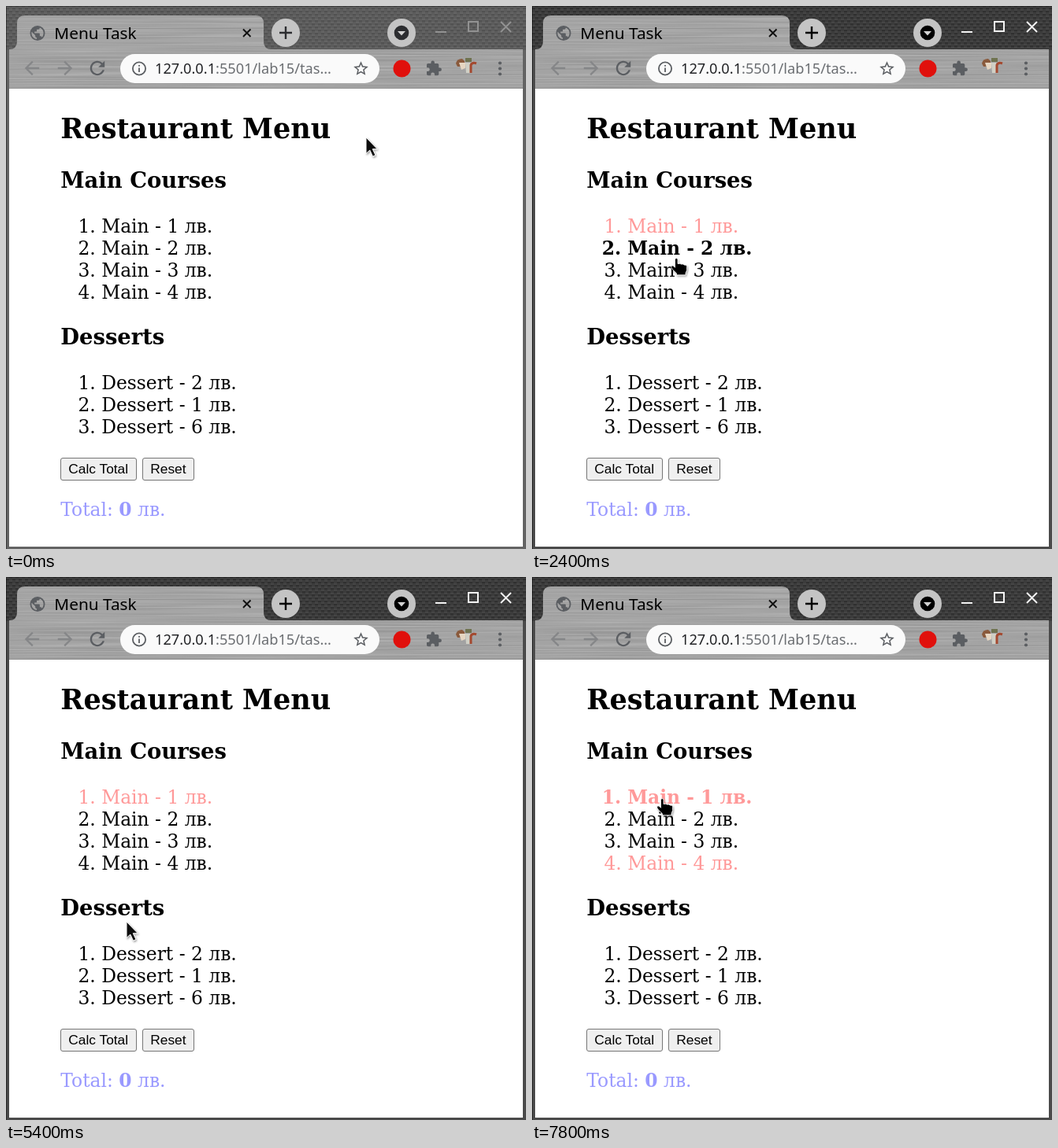
These frames come from a looping animation (660x690 px, 8 s). An HTML page:

```html
<!DOCTYPE html>
<html lang="en">
<head>
<meta charset="utf-8">
<title>Menu Task</title>
<style>
  html, body { margin: 0; width: 100%; height: 100%; overflow: hidden; }
  svg { display: block; width: 660px; height: 690px; }
  text { white-space: pre; }
  .page { font: 23.4px "DejaVu Serif", serif; }
  .ui { font-family: "Noto Sans", sans-serif; }
  .btn { font: 17.33px "Liberation Sans", Arial, sans-serif; }
  .b { font-weight: bold; }
  #win { --base: #5c5c5c; --dark: #505050; --lite: #676767; --edge: #636363; --ctl: #929292; --ink: #2c2d30; }
  #win.on { --base: #3c3c3c; --dark: #2e2e2e; --lite: #484848; --edge: #4a4a4a; --ctl: #f4f4f4; --ink: #000; }
</style>
</head>
<body>
<svg id="win" viewBox="0 0 660 690">
  <defs>
    <pattern id="weave" width="8" height="8" patternUnits="userSpaceOnUse">
      <rect width="8" height="8" fill="var(--base)"/>
      <path d="M0 1h4M4 5h4" stroke="var(--lite)" stroke-width="1.6"/>
      <path d="M0 3.2h4M4 7.2h4" stroke="var(--dark)" stroke-width="1.8"/>
    </pattern>
    <filter id="metal" x="0" y="0" width="1" height="1" color-interpolation-filters="sRGB">
      <feTurbulence type="fractalNoise" baseFrequency=".005 .6" numOctaves="2" seed="4"/>
      <feColorMatrix values=".18 0 0 0 .55  .18 0 0 0 .55  .18 0 0 0 .55  0 0 0 0 1"/>
      <feComposite in2="SourceGraphic" operator="in"/>
    </filter>
    <filter id="shade" x="-30%" y="-30%" width="170%" height="170%">
      <feDropShadow dx="1" dy="1.5" stdDeviation="1" flood-opacity=".4"/>
    </filter>
  </defs>

  <!-- window frame -->
  <rect width="660" height="690" fill="var(--edge)"/>
  <rect width="660" height="56" fill="url(#weave)"/>
  <path d="M.5 690V.5H660" fill="none" stroke="#000" stroke-opacity=".4"/>
  <path d="M4 55Q14 55 14 45V22Q14 12 24 12H317Q327 12 327 22V45Q327 55 337 55H656V105H4Z" filter="url(#metal)"/>
  <rect x="4" y="104" width="652" height="1" fill="#8d8d8d"/>
  <rect x="4" y="105" width="652" height="582" fill="#fff"/>

  <!-- tab strip -->
  <text class="ui" x="61.3" y="41.5" font-size="20.8">Menu Task</text>
  <path d="M301 29.5l9.5 9.5M310.5 29.5l-9.5 9.5" stroke="#111" stroke-width="2"/>
  <circle cx="355" cy="34" r="18" fill="#c4c4c4"/>
  <path d="M347 34h16M355 26v16" stroke="var(--ink)" stroke-width="2.4"/>
  <circle cx="502" cy="34" r="18" fill="#c4c4c4"/>
  <circle cx="502" cy="34" r="9.3" fill="var(--ink)"/>
  <path d="M497 32h10l-5 5.500z" fill="#d2d2d2"/>
  <path d="M545 33h14M587 20h12v12h-12zM628 20l13 13M641 20l-13 13" fill="none" stroke="var(--ctl)" stroke-width="2"/>

  <!-- toolbar -->
  <rect x="145" y="61" width="329" height="37" rx="18.5" fill="#fafafa"/>
  <text class="ui" x="189" y="86" font-size="18.2" fill="#202124">127.0.0.1<tspan fill="#6a6d71">:5501/lab15/tas…</tspan></text>
  <circle cx="502.5" cy="79.5" r="11" fill="#e0100c"/>
  <g id="icons" fill="#5b5e62"></g>
  <g>
    <path d="M571 73q1-6 8-6l3 3v7h-9z" fill="#8a5a3c"/>
    <path d="M575 72h8v7l-5 2z" fill="#e6d6c2"/>
    <path d="M583 66h8v5h-8z" fill="#6f7350"/>
    <path d="M583 72h6v13h-5z" fill="#d0d0c6"/>
    <path d="M590 85V75q2-4 7-2" fill="none" stroke="#a4492f" stroke-width="3"/>
  </g>

  <!-- page -->
  <g class="page">
    <text class="b" x="69.3" y="168" font-size="35.1">Restaurant Menu</text>
    <g class="b" font-size="27.4">
      <text x="69.3" y="231">Main Courses</text>
      <text x="69.3" y="430">Desserts</text>
    </g>
    <g id="list"></g>
    <text x="69.3" y="648" fill="#99f">Total: <tspan class="b">0</tspan> лв.</text>
  </g>
  <g class="btn">
    <g fill="#efefef" stroke="#767676">
      <rect x="69.5" y="574.5" width="96" height="28" rx="2.5"/>
      <rect x="173.5" y="574.5" width="65" height="28" rx="2.5"/>
    </g>
    <text x="79.3" y="594">Calc Total</text>
    <text x="183.3" y="594">Reset</text>
  </g>

  <g id="cursor" stroke="#fff" stroke-linejoin="round" filter="url(#shade)">
    <path id="arrow" d="M0 0V20.500l4.800-4.300 3.700 8 3.500-1.600-3.700-7.800h6z" fill="#111"/>
    <path id="hand" stroke-width=".8" d="M-1.500 1.300a1.700 1.700 0 0 1 3.500 0V6.500l3-.2 1 .8 3-.1 1 1 2.500.3q1 .5 1 2v4.500l-1.500 3.500v2.500H.5v-2L-4.500 14Q-6.500 11.500-6.500 9.500q2-1.500 4 .8l1 1z"/>
  </g>
</svg>
<script>
const LOOP = 8000, STEP = 100, LINE = 28, ASCENT = 22, LIST_X = 121.2;
const FOCUS = 1600, SECOND_CLICK = 6300;
const $ = id => document.getElementById(id);

function add(parent, tag, attrs = {}, content = '') {
  const el = document.createElementNS('http://www.w3.org/2000/svg', tag);
  for (const key in attrs) el.setAttribute(key, attrs[key]);
  el.textContent = content;
  parent.append(el);
  return el;
}

// icons are drawn on a 24-unit grid centred on x, y
function icon(x, y, scale, d, fill = 'inherit', flip = 1) {
  const transform = `translate(${x} ${y}) scale(${scale * flip} ${scale}) translate(-12 -12)`;
  add($('icons'), 'path', { d, transform, style: `fill:${fill}`, 'fill-rule': 'evenodd' });
}

const back = 'M20 11H7.8l5.600-5.600L12 4l-8 8 8 8 1.400-1.400L7.800 13H20z';
icon(33, 79, 1.15, back, '#858688');
icon(75, 79, 1.15, back, '#858688', -1);
icon(116, 79, 1.15, 'M17.65 6.35A8 8 0 1 0 19.73 14h-2.080A6 6 0 1 1 12 6c1.660 0 3.140.69 4.220 1.780L13 11h7V4z');
icon(40, 34.5, .95, 'M12 2a10 10 0 1 0 0 20 10 10 0 0 0 0-20zM11 19.930C7 19.440 4 16.080 4 12q0-.9.2-1.800L9 15v1a2 2 0 0 0 2 2zM17.900 17.400A2 2 0 0 0 16 16h-1v-3a1 1 0 0 0-1-1H8v-2h2a1 1 0 0 0 1-1V7h2a2 2 0 0 0 2-2v-.4a8 8 0 0 1 2.900 12.800z');
icon(169, 79.5, .9, 'M11 7h2v2h-2zM11 11h2v6h-2zM12 2a10 10 0 1 0 0 20 10 10 0 0 0 0-20zM12 20a8 8 0 1 1 0-16 8 8 0 0 1 0 16z');
icon(450.5, 79.5, .93, 'M22 9.240l-7.190-.62L12 2 9.190 8.630 2 9.240l5.460 4.730L5.820 21 12 17.270 18.180 21l-1.630-7.030zM12 15.400l-3.760 2.270 1-4.280-3.320-2.880 4.380-.38L12 6.100l1.710 4.040 4.380.38-3.320 2.880 1 4.280z');
icon(543, 79.3, .9, 'M20.500 11H19V7a2 2 0 0 0-2-2h-4V3.500a2.500 2.500 0 0 0-5 0V5H4a2 2 0 0 0-2 2v3.800h1.500a2.700 2.700 0 0 1 0 5.400H2V20a2 2 0 0 0 2 2h3.800v-1.500a2.700 2.700 0 0 1 5.400 0V22H17a2 2 0 0 0 2-2v-4h1.500a2.500 2.500 0 0 0 0-5z');
for (const dy of [-7, 0, 7]) add($('icons'), 'circle', { cx: 627, cy: 79.5 + dy, r: 2.1 });

// time, x, y of the pointer's hot spot
const path = [
  [0, 457, 167], [200, 457, 167], [1100, 263, 261], [1400, 235, 268],
  [1800, 235, 268], [2400, 183, 321], [2900, 183, 321], [3600, 143, 444],
  [3800, 144, 471], [4400, 147, 531], [4500, 147, 531], [4700, 148, 521],
  [5400, 153, 438], [6200, 161, 363], [6500, 161, 363], [6700, 162, 366],
  [6900, 162, 366], [7800, 165, 282], [LOOP, 165, 282]
];

function addItems(name, prices, baseline) {
  return prices.map((price, i) => {
    const el = add($('list'), 'g');
    const y = baseline + i * LINE;
    add(el, 'text', { x: LIST_X, y, 'text-anchor': 'end' }, `${i + 1}. `);
    add(el, 'text', { x: LIST_X, y }, `${name} - ${price} лв.`);
    return { el, top: y - ASCENT, redFrom: Infinity };
  });
}

const items = [
  ...addItems('Main', [1, 2, 3, 4], 288),
  ...addItems('Dessert', [2, 1, 6], 487)
];
items[0].redFrom = FOCUS;
items[3].redFrom = SECOND_CLICK;

function pointerAt(t) {
  const i = path.findIndex(p => p[0] > t);
  const [t0, x0, y0] = path[i - 1], [t1, x1, y1] = path[i];
  const u = (t - t0) / (t1 - t0);
  const e = (u + u * u * (3 - 2 * u)) / 2;
  return [x0 + (x1 - x0) * e, y0 + (y1 - y0) * e].map(Math.round);
}

function draw(now) {
  const t = Math.floor(now % LOOP / STEP) * STEP;
  const [x, y] = pointerAt(t);
  let over = false;
  for (const { el, top, redFrom } of items) {
    const hover = y >= top && y < top + LINE;
    over ||= hover;
    el.setAttribute('class', hover ? 'b' : '');
    el.setAttribute('fill', t >= redFrom ? '#f99' : '#000');
  }
  $('win').setAttribute('class', t >= FOCUS ? 'on' : '');
  $('cursor').setAttribute('transform', `translate(${x} ${y})`);
  $('arrow').style.display = over ? 'none' : '';
  $('hand').style.display = over ? '' : 'none';
}

const start = performance.now();
function tick() {
  draw(performance.now() - start);
  requestAnimationFrame(tick);
}
tick();
</script>
</body>
</html>
```
